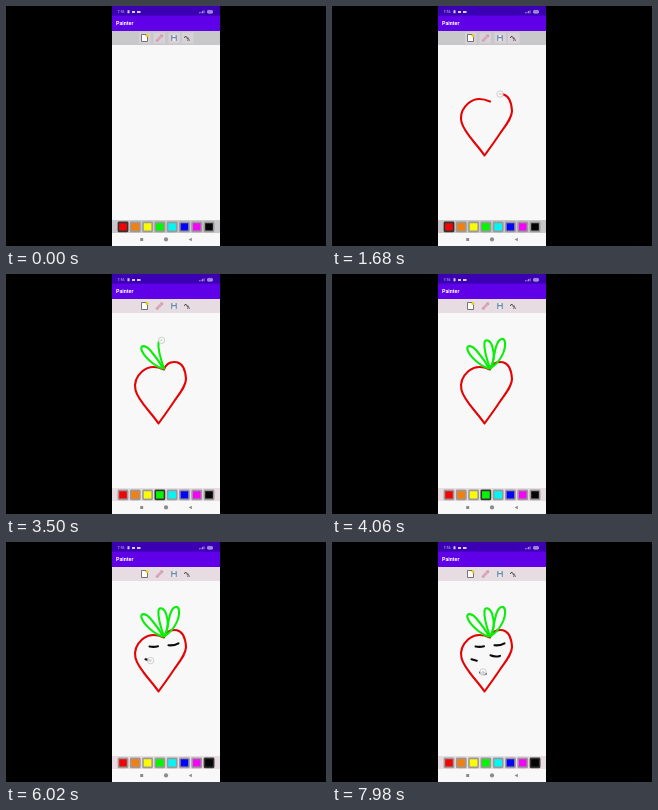
These frames come from a looping animation (320 px wide and 240 px high, 8 s). An HTML page:

```html
<!DOCTYPE html>
<html lang="en">
<head>
<meta charset="utf-8">
<title>Drawing app</title>
<style>
html, body { margin: 0; height: 100%; overflow: hidden; background: #000; }
svg { display: block; width: 100vw; height: 100vh; }
text { font-family: Roboto, Arial, sans-serif; fill: #fff; }
#ink path { fill: none; stroke-width: 2.1; stroke-linecap: round; stroke-linejoin: round; }
</style>
</head>
<body>
<svg viewBox="0 0 320 240">
  <rect x="106" width="108" height="240" fill="#f8f8f8"/>
  <rect x="106" width="108" height="10" fill="#3a00b2"/>
  <rect x="106" y="9.6" width="108" height="15.4" fill="#6000e8"/>
  <text x="110" y="19.2" font-size="5.4" font-weight="700">Painter</text>

  <!-- status bar -->
  <g opacity=".8">
    <text x="111.5" y="7.2" font-size="3.6">7:56</text>
    <path d="M121.5 4.3h2v3h-2zM126 5h3v2h-3zM131 5h3.5v2H131z" fill="#fff"/>
    <path d="M193.5 7.3v-1M195 7.3V5.8M196.500 7.3V5M198 7.3V4.4" stroke="#fff" stroke-width=".7"/>
    <rect x="201.500" y="4.400" width="5" height="2.800" rx=".7" fill="#b9a0e8" stroke="#fff" stroke-width=".5"/>
  </g>

  <rect class="bar" x="106" y="25" width="108" height="14"/>
  <rect class="bar" x="106" y="214" width="108" height="13"/>
  <g id="keys" fill="#d8d2d8"></g>

  <!-- new page, brush, save, line size -->
  <path d="M135.500 28.500h4.500l1.500 2v5h-6z" fill="#fff" stroke="#555" stroke-width=".8"/>
  <circle cx="141" cy="29.500" r="1.500" fill="#f3c51f"/>
  <path d="M151 34.500l5-5" stroke="#dba7b7" stroke-width="2.800" stroke-linecap="round"/>
  <path d="M150.500 34l1.500 1.500M154.500 28.500l2.500 2.500" stroke="#a99ba8" stroke-width=".7"/>
  <rect x="165.200" y="29" width="5.600" height="6" rx=".6" fill="#7089aa"/>
  <path d="M166.500 29h3v2h-3zM166.300 32.300h3.400V35h-3.400z" fill="#e9edf4"/>
  <path d="M178.500 32q0-2 1.500-1.500t1 2q1-1 2 0M181 34.300q1.500-1 3 0" fill="none" stroke="#444" stroke-width=".9"/>

  <g id="palette"></g>

  <!-- navigation -->
  <g fill="#8b8b8b">
    <rect x="134.200" y="232" width="3" height="3"/>
    <circle cx="160" cy="233.400" r="2.100"/>
    <path d="M185.800 231.700v3.600l-3.200-1.800z"/>
  </g>

  <g id="ink"></g>
  <g id="touch">
    <circle r="3.200" fill="#fafafa" fill-opacity=".85" stroke="#bbb" stroke-width=".7"/>
    <circle r=".8" fill="#ccc"/>
  </g>
</svg>
<script>
const LOOP = 8000, STEP = 140;
const RED = '#e30505', GREEN = '#0bed0b', BLACK = '#0b0b0b';
const $ = id => document.getElementById(id);

function add(parent, tag, attrs) {
  const el = document.createElementNS('http://www.w3.org/2000/svg', tag);
  for (const name in attrs) el.setAttribute(name, attrs[name]);
  return parent.appendChild(el);
}

for (const x of [133, 147.5, 162.5, 176])
  add($('keys'), 'rect', { x, y: 26.5, width: 11.5, height: 11 });

const swatches = ['#f00404', '#f28010', '#fbfb05', '#05f505', '#05f5f5', '#0505f5', '#f505f5', '#050505']
  .map((fill, i) => add($('palette'), 'rect', {
    x: 112.4 + i * 12.29, y: 216.4, width: 9.2, height: 9, rx: .6, fill, 'stroke-width': 1.6
  }));

// colour, start, end, path
const strokes = [
  [RED, 840, 1750, 'M158 95.500C149 91.500 141 93 136 97.500C131 102 128 109 129.500 116C132 127 145 138 152.500 149.500C158 142 163 135 168 127.500C174 119 180 112 180 105C179.500 96 177.500 90 171 88.300C164 87.200 160 90 158 95.500'],
  [GREEN, 3010, 3300, 'M157 94.500C148 92 137 82 135.300 75C135 70.500 140 71.500 144 76C149 82 154 88 157 94.500'],
  [GREEN, 3360, 3640, 'M158 94.500C155 86 151.500 76 152.500 68.500C153.500 64.500 158 66 160 71.500C162.500 79 163 87 158 94.500'],
  [GREEN, 3660, 3950, 'M159 94C162 87 162 76 165.500 69C167.500 64 172 63.500 173 68C174 76 169 87 159 94'],
  [BLACK, 5130, 5330, 'M143.500 104.500Q148 105.300 152 104.300'],
  [BLACK, 5440, 5640, 'M162.500 103.300Q168 103.800 172.500 101.300'],
  [BLACK, 5800, 6030, 'M139.500 117.300L144.800 118.700'],
  [BLACK, 6400, 6640, 'M158.500 113.300Q163 115.300 168 113.900'],
  [BLACK, 7350, 7980, 'M148 130.500Q151 132.800 153.700 131.800L151 130']
].map(([stroke, from, to, d]) => {
  const el = add($('ink'), 'path', { d, stroke });
  return { el, from, to, length: el.getTotalLength() };
});

// time, swatch chosen
const picks = [[0, 0], [2380, 3], [4620, 7]];

function render(ms) {
  const t = Math.floor(ms / STEP) * STEP;
  let touch = null;

  for (const { el, from, to, length } of strokes) {
    const done = length * Math.min(1, Math.max(0, (t - from) / (to - from)));
    el.style.display = done > 0 ? '' : 'none';
    el.setAttribute('stroke-dasharray', done < length ? `${done} ${length * 2}` : 'none');
    if (t >= from && t < to + 50) touch = el.getPointAtLength(done);
  }

  const [since, chosen] = picks.filter(p => p[0] <= t).pop();
  swatches.forEach((s, i) => s.setAttribute('stroke', i === chosen ? '#333' : '#999'));
  if (since && t < since + 2 * STEP) touch = { x: 117 + chosen * 12.29, y: 221 };

  const grey = t < 2380;
  for (const bar of document.querySelectorAll('.bar'))
    bar.setAttribute('fill', grey ? '#c8c8ca' : '#e7dce1');
  $('keys').style.display = grey ? '' : 'none';

  $('touch').style.display = touch ? '' : 'none';
  if (touch) $('touch').setAttribute('transform', `translate(${touch.x} ${touch.y})`);
}

const start = performance.now();
function tick() {
  render((performance.now() - start) % LOOP);
  requestAnimationFrame(tick);
}
tick();
</script>
</body>
</html>
```
